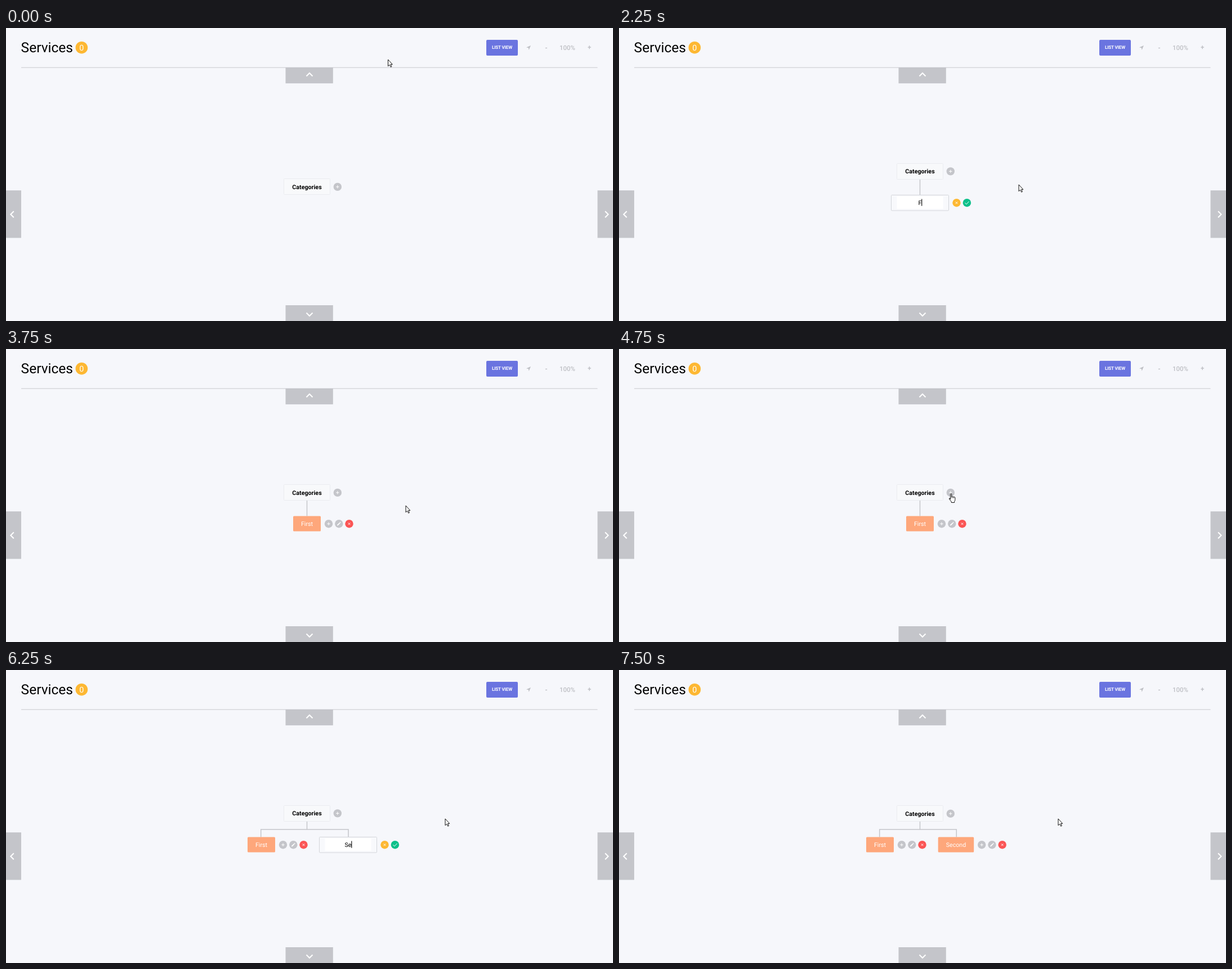
Animation, 1078 px wide and 520 px high, one loop 8000 ms. Source, as an HTML page:

```html
<!DOCTYPE html>
<html lang="en">
<head>
<meta charset="utf-8">
<title>Services</title>
<style>
html, body { margin: 0; width: 100%; height: 100%; overflow: hidden; background: #f6f7fb; }
svg { display: block; font: 10.7px Roboto, sans-serif; text-rendering: geometricPrecision; }
.mid { text-anchor: middle; }
.bold { font-weight: 700; }
.line { fill: none; stroke: #fff; }
.wire { fill: none; stroke: #c4c5ca; stroke-width: 1.5; }
.cursor { fill: #fff; stroke: #111; stroke-linejoin: round; }
</style>
</head>
<body>
<svg width="1078" height="520" viewBox="0 0 1078 520">
  <text x="26.6" y="43" font-size="24.5">Services</text>
  <circle cx="134.3" cy="34.7" r="10.8" fill="#fdb833"/>
  <text class="mid" x="134.3" y="39.6" font-size="14.2" fill="#fff">0</text>
  <rect x="853" y="21" width="56" height="28" rx="2" fill="#6a74e0"/>
  <text class="mid bold" x="881" y="37.2" font-size="8" letter-spacing="-.15" fill="#fff">LIST VIEW</text>
  <g fill="#bfc0c5">
    <path d="M932 31L924 34.6L927.8 35.3L928.5 39Z"/>
    <g class="mid bold" font-size="11.4">
      <text x="959.5" y="38.5">-</text>
      <text x="997" y="38.5" font-weight="500">100%</text>
      <text x="1036" y="38">+</text>
    </g>
  </g>
  <path d="M27 70.2H1050.5" stroke="#c8c9cd"/>
  <path d="M496.5 70h84.3v28.3h-84.3zM496.5 492h84.3v28h-84.3zM0 288.3h27v84.3h-27zM1050.5 288.3h27.5v84.3h-27.5z" fill="#c4c5ca"/>
  <path class="line" stroke-width="2" d="M533.5 85.5l5.5-5.5l5.5 5.5M533.5 505.5l5.5 5.5l5.5-5.5M13.8 325.3l-5.5 5.5l5.5 5.5M1064 325.3l5.5 5.5l-5.5 5.5"/>
  <g id="tree"></g>
  <g id="pointer" class="cursor"></g>
</svg>
<script>
const LOOP = 8000, GRAY = '#c4c5ca', YELLOW = '#fdb833', GREEN = '#0cc08a', RED = '#fb5555';
const pen = document.createElement('canvas').getContext('2d');

// Each step changes part of the state at its time.
const steps = [
  [0, { stage: 'root', pos: [678, 55.5], hand: false, text: '', caret: true }],
  [250, { pos: [581.5, 220] }],
  [500, { pos: [581, 272] }],
  [750, { pos: [588, 281], hand: true }],
  [1000, { stage: 'edit1', pos: [709.5, 277.5], hand: false }],
  [1500, { caret: false }],
  [2000, { caret: true }],
  [2250, { text: 'F' }],
  [2500, { text: 'Fi' }],
  [2750, { text: 'Fir' }],
  [3000, { text: 'Firs' }],
  [3250, { text: 'First' }],
  [3750, { stage: 'one', text: '' }],
  [4250, { pos: [603.5, 169] }],
  [4500, { pos: [583.5, 265] }],
  [4750, { pos: [585.7, 256], hand: true }],
  [5000, { stage: 'edit2', pos: [608.5, 250], hand: false }],
  [5250, { pos: [779.5, 263.5] }],
  [5500, { caret: false }],
  [5750, { text: 'S', caret: true }],
  [6250, { text: 'Se' }],
  [6500, { text: 'Sec' }],
  [6750, { text: 'Secon' }],
  [7250, { text: 'Second' }],
  [7500, { stage: 'two' }]
];

const icons = {
  plus: '<path class="line" d="M-2.7 0H2.7M0 -2.7V2.7"/>',
  cross: '<path class="line" d="M-1.8 -1.8L1.8 1.8M-1.8 1.8L1.8 -1.8"/>',
  check: '<path class="line" d="M-3.5 0L-1 2.6L3.7 -2.4"/>',
  pencil: '<path class="line" stroke-width="1.8" d="M-2.2 2.2L1.6 -1.6"/><path fill="#fff" d="M-3.3 3.3l.5-2.2l1.7 1.7zM1.3 -2.7l1-.7l1.2 1.2l-.8 1z"/>'
};

const button = (x, y, color, icon) =>
  `<g transform="translate(${x} ${y})"><circle r="7.2" fill="${color}"/>${icons[icon]}</g>`;

const label = (x, y, text, attrs = '') => `<text class="mid" x="${x}" y="${y}" ${attrs}>${text}</text>`;

const wire = d => `<path class="wire" d="${d}"/>`;

function root(y, shift = 0) {
  return `<rect x="493.5" y="${y}" width="82" height="28" rx="1" fill="#f8f9fb" stroke="#eaecf0"/>` +
    `<text class="mid bold" x="534.5" y="${y + 18.3 + shift}">Categories</text>` +
    button(588.8, y + 14.4 + shift, GRAY, 'plus');
}

function node(x, width, text) {
  const end = x + width;
  return `<rect x="${x}" y="296.5" width="${width}" height="27" rx="1.5" fill="#fea77b"/>` +
    label(x + width / 2, 314, text, 'fill="#fff"') +
    button(end + 14, 310.2, GRAY, 'plus') +
    button(end + 32.3, 310.2, GRAY, 'pencil') +
    button(end + 50.5, 310.2, RED, 'cross');
}

function editor(mid, { text, caret }) {
  pen.font = '10.7px Roboto, sans-serif';
  const x = mid + (text ? pen.measureText(text).width / 2 + .3 : .5);
  return `<rect x="${mid - 51}" y="296.5" width="102" height="27.5" rx="1" fill="#f8f9fc" stroke="#d3d5da"/>` +
    `<rect x="${mid - 41}" y="299" width="82" height="22" fill="#fff"/>` +
    (text ? label(mid, 313.7, text) : label(mid, 313.7, 'Category Name', 'fill="#8a8a8a"')) +
    (caret ? `<path d="M${x} 303.5V315.7" stroke="#000" stroke-width="1.1"/>` : '') +
    button(mid + 65, 310.2, YELLOW, 'cross') +
    button(mid + 83.4, 310.2, GREEN, 'check');
}

const stem = wire('M534.5 268V296.5');
const fork = (a, b) => wire(`M534.5 268V283M${a} 296.5V283H${b}V296.5`);

const stages = {
  root: () => root(267.5),
  edit1: s => stem + root(240.5, -.5) + editor(534.5, s),
  one: () => stem + root(240.5) + node(510, 49, 'First'),
  edit2: s => fork(452.7, 608) + root(240.5, -.5) + node(429, 49, 'First') + editor(607.5, s),
  two: () => fork(462.7, 599.3) + root(240.5) + node(439, 49, 'First') + node(566.7, 63.5, 'Second')
};

const arrow = '<path d="M.5 .5V12.3L3.2 9.8L5.2 13.8L6.9 13L5.1 9.1H8.3Z"/>';
const hand = '<path d="M3 11V1.8q0-1.2 1-1.2t1 1.2V6.2q1.1-1.2 2 .2q1.1-1 2 .3q1.6-.8 2.2 .9V11.5q0 2-1.3 3.2V16.5H4.6V15L.8 10.2q-.4-1.6 1-1.5Z"/>' +
  '<path d="M5 6V8.5M7 6.4V8.7M9 6.7V8.9" stroke-width=".7"/>';

let shown = -1;
function draw(now) {
  const time = now % LOOP;
  const count = steps.filter(([at]) => at <= time).length;
  if (count !== shown) {
    shown = count;
    const state = Object.assign({}, ...steps.slice(0, count).map(step => step[1]));
    tree.innerHTML = stages[state.stage](state);
    pointer.innerHTML = state.hand ? hand : arrow;
    pointer.setAttribute('transform', `translate(${state.pos})`);
  }
}

const tree = document.getElementById('tree'), pointer = document.getElementById('pointer');
const start = performance.now();
function tick() {
  draw(performance.now() - start);
  requestAnimationFrame(tick);
}
tick();
</script>
</body>
</html>
```
